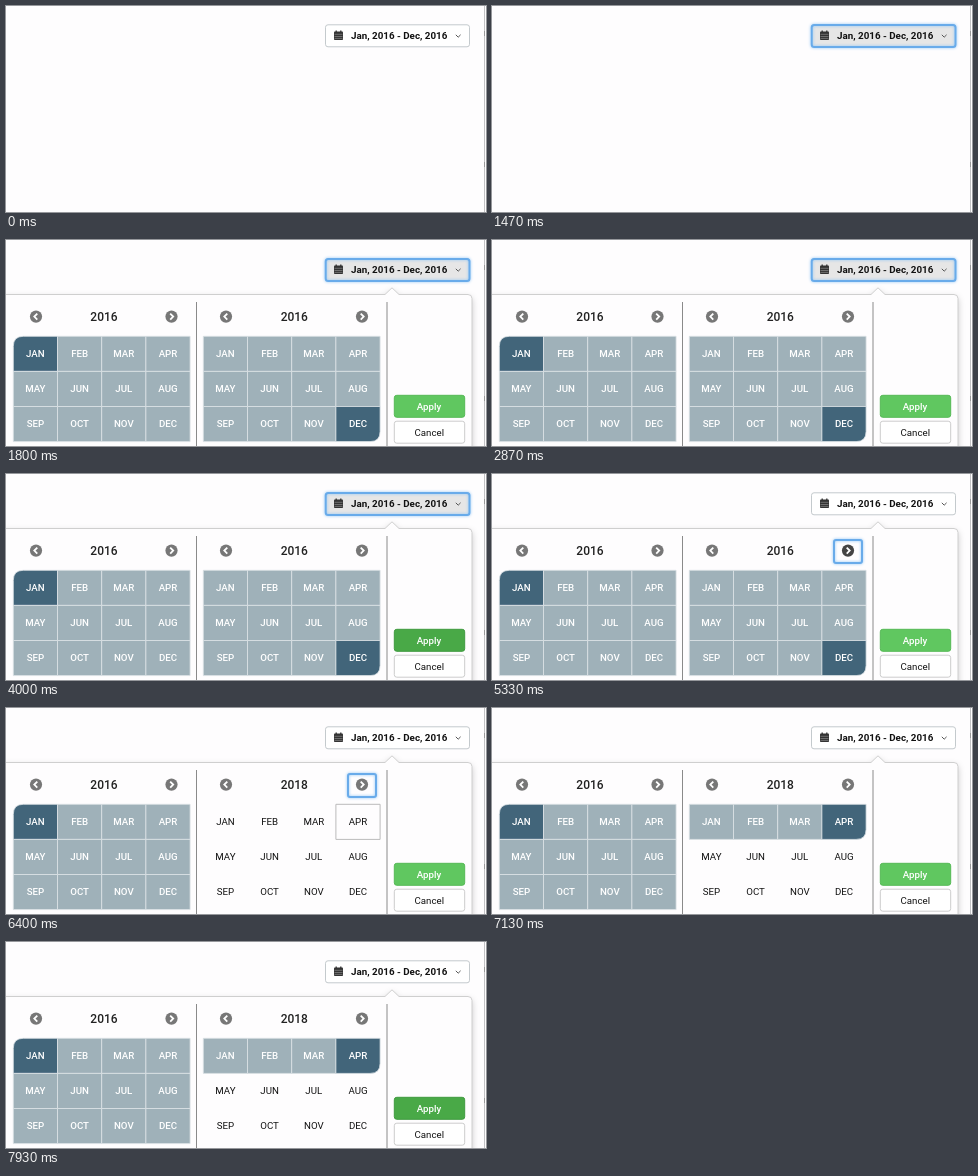
An HTML page for the animation above (8000 ms loop, 480 by 206 pixels).

```html
<!DOCTYPE html>
<html lang="en">
<head>
<meta charset="utf-8">
<title>Month range picker</title>
<style>
html, body { margin: 0; width: 100%; height: 100%; overflow: hidden; background: #fefdfe; }
svg { display: block; width: 480px; height: 206px; font: 500 9.7px Roboto, "Liberation Sans", sans-serif; }
text { text-anchor: middle; fill: #111; }
.title { font-size: 12px; fill: #222; }
.shadow { filter: drop-shadow(0 3px 3px rgba(0, 0, 0, .2)); }
.ring { fill: none; stroke: #69abea; stroke-width: 2; filter: drop-shadow(0 0 1.5px #8ec5f5); }
</style>
</head>
<body>
<svg id="stage" viewBox="0 0 480 206" xmlns="http://www.w3.org/2000/svg"></svg>
<script>
const LOOP = 8000;
const MONTHS = 'JAN FEB MAR APR MAY JUN JUL AUG SEP OCT NOV DEC'.split(' ');
const CELL = { w: 44.2, h: 35.1, top: 96.3 };
const RANGE = '#9fb1b9', EDGE = '#42657a';

const stage = document.getElementById('stage');

function add(parent, tag, attrs = {}, label) {
  const node = document.createElementNS('http://www.w3.org/2000/svg', tag);
  for (const key in attrs) node.setAttribute(key, attrs[key]);
  if (label !== undefined) node.textContent = label;
  parent.append(node);
  return node;
}
const rect = (parent, x, y, width, height, attrs) =>
  add(parent, 'rect', { x, y, width, height, ...attrs });
const path = (parent, d, attrs) => add(parent, 'path', { d, fill: 'none', ...attrs });
const set = (node, key, value) => {
  if (node.getAttribute(key) !== String(value)) node.setAttribute(key, value);
};
const show = (node, on) => set(node, 'visibility', on ? 'visible' : 'hidden');
const within = (t, from, to = LOOP) => t >= from && t < to;

// Page edge
path(stage, 'M478.5 0V206', { stroke: '#c2c2c4' });
path(stage, 'M478.5 25v5M478.5 156v5', { stroke: '#999' });

// Date range button
const field = rect(stage, 319.5, 18.8, 144, 22, { rx: 2.5, stroke: '#c4cacd' });
const fieldRing = rect(stage, 319.7, 18.9, 143.8, 22, { rx: 2.5, class: 'ring' });
rect(stage, 328, 25.5, 9, 8.5, { rx: .8, fill: '#333' });
path(stage, 'M328.5 27.8h8M330.2 24.5v2M334.8 24.5v2', { stroke: '#333', 'stroke-width': 1.3 });
path(stage, 'M328.5 28.3h8M328.5 30.5h8M328.5 32.4h8', { stroke: '#aaa', 'stroke-width': .5 });
add(stage, 'text', { x: 393.2, y: 33.4, 'font-weight': 700, 'font-size': 9.8 }, 'Jan, 2016 - Dec, 2016');
path(stage, 'M449.8 28.8l2.4 2.4l2.4-2.4', { stroke: '#555', 'stroke-width': 1 });

// Popup
const popup = add(stage, 'g');
path(popup, 'M-8 54.5H379L386 47.8L393 54.5H462Q466 54.5 466 58.5V216H-8Z',
  { style: 'fill:#fefdfe', stroke: '#cfcfcf', class: 'shadow' });
path(popup, 'M190.5 62V206M381 62V206', { stroke: '#8a8a8a' });

function arrow(x, dir) {
  const disc = add(popup, 'circle', { cx: x, cy: 76.6, r: 6.1, fill: '#777' });
  path(popup, `M${x - dir * 1.3} 73.6l${dir * 3} 3l${-dir * 3} 3`,
    { stroke: '#fff', 'stroke-width': 1.8 });
  return disc;
}

function cellShape(x, y, topLeft, bottomRight) {
  const { w, h } = CELL, a = topLeft ? 10 : 0, b = bottomRight ? 10 : 0;
  return `M${x + a} ${y}H${x + w}V${y + h - b}q0 ${b} ${-b} ${b}H${x}V${y + a}q0 ${-a} ${a} ${-a}Z`;
}

function calendar(left, titleX, prevX, nextX) {
  arrow(prevX, -1);
  const next = arrow(nextX, 1);
  const title = add(popup, 'text', { x: titleX, y: 81, class: 'title' }, '2016');
  const cells = MONTHS.map((name, i) => {
    const x = left + (i % 4) * CELL.w, y = CELL.top + Math.floor(i / 4) * CELL.h;
    const box = path(popup, '', { 'stroke-width': 1 });
    const label = add(popup, 'text', { x: x + CELL.w / 2, y: y + 20.8 }, name);
    return { x, y, box, label };
  });
  return { title, next, cells };
}

// Months from first to last are filled; hover outlines a free month.
function paint(cal, year, first, last, hover = -1) {
  if (cal.title.textContent !== String(year)) cal.title.textContent = year;
  cal.cells.forEach(({ x, y, box, label }, i) => {
    const filled = i <= last, start = i === first, end = i === last && last !== cal.openEnd;
    set(box, 'd', cellShape(x, y, start, end));
    set(box, 'fill', filled ? (start || end ? EDGE : RANGE) : 'none');
    set(box, 'stroke', filled ? '#dce3e6' : i === hover ? '#bbb' : 'none');
    set(box, 'stroke-width', filled ? .8 : 1);
    set(label, 'style', filled ? 'fill:#fff' : 'font-weight:400');
  });
}

const from = calendar(7.3, 98, 30, 165.5);
from.openEnd = 11;
const to = calendar(197.3, 288.3, 220, 356);
const nextRing = rect(popup, 342, 66, 28, 23, { rx: 2, class: 'ring' });

const apply = rect(popup, 388.3, 155.3, 70.4, 22, { rx: 2.5 });
add(popup, 'text', { x: 423, y: 169.8, style: 'fill:#fff' }, 'Apply');
rect(popup, 388.3, 181.2, 70.4, 22, { rx: 2.5, fill: '#fff', stroke: '#ccc' });
add(popup, 'text', { x: 423.3, y: 195.5, 'font-weight': 400 }, 'Cancel');

paint(from, 2016, 0, 11);

function render(t) {
  set(field, 'fill', within(t, 1330, 5200) ? '#e6e6e6' : '#fff');
  show(fieldRing, within(t, 1470, 5200));
  set(popup, 'display', t >= 1530 ? 'inline' : 'none');
  show(nextRing, t >= 1530 && within(t, 5200, 6670));
  set(to.next, 'fill', within(t, 5000, 6070) ? '#444' : '#777');

  const year = t < 5400 ? 2016 : t < 5730 ? 2017 : 2018;
  const last = t < 5400 ? 11 : t < 6670 ? -1 : 3;
  paint(to, year, -1, last, within(t, 6270, 6670) ? 3 : -1);

  const hot = within(t, 3470, 4600) || within(t, 7600);
  set(apply, 'fill', hot ? '#49a947' : '#60c760');
  set(apply, 'stroke', hot ? '#3f9a3f' : '#55b955');
}

function tick(now) {
  render(now % LOOP);
  requestAnimationFrame(tick);
}
render(0);
requestAnimationFrame(tick);
</script>
</body>
</html>
```
